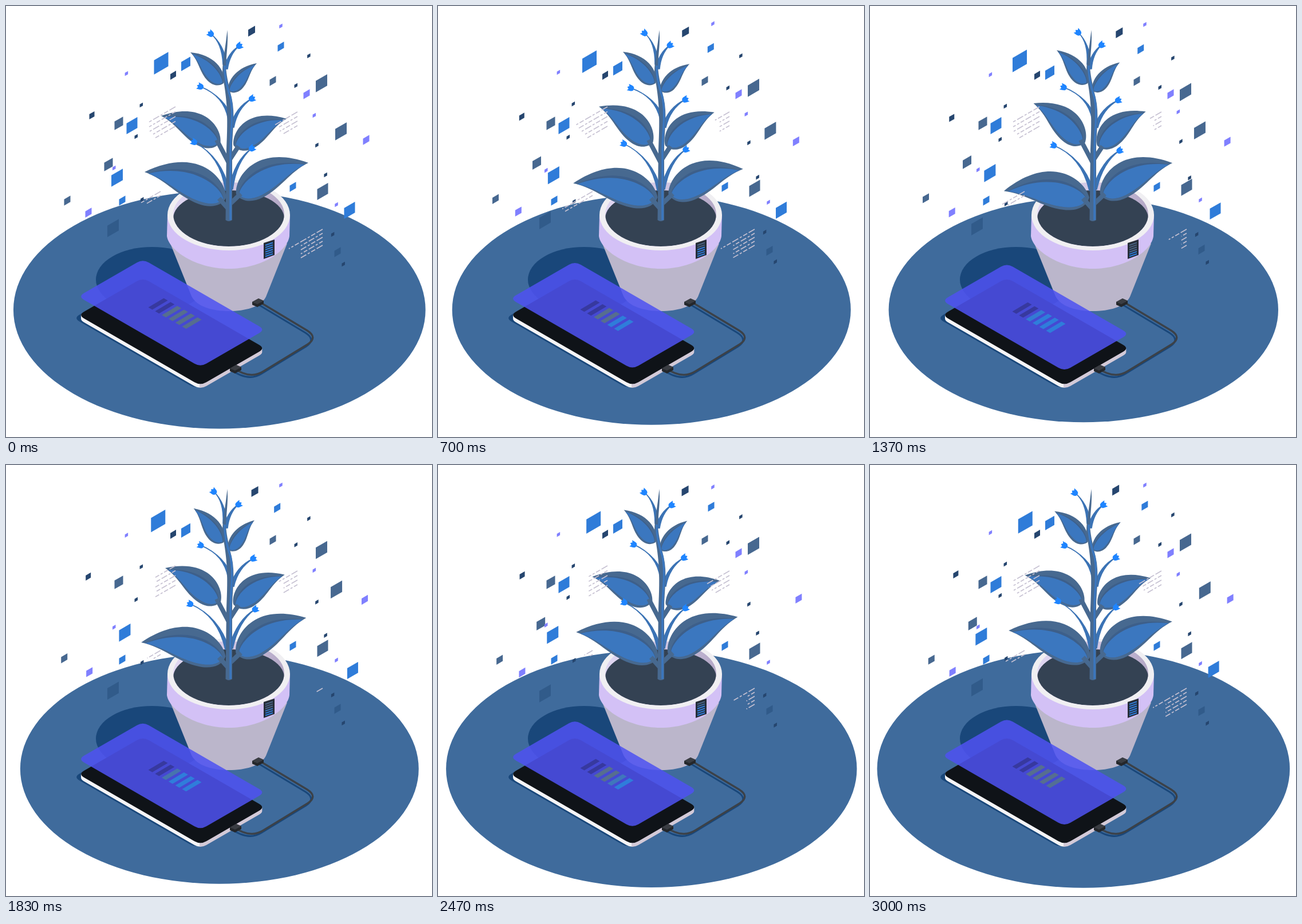
Write an HTML page with a canvas that moves like this. It is 744 by 753 pixels and loops after 3.03 s.

```html
<!DOCTYPE html>
<html lang="en">
<head>
<meta charset="utf-8">
<title>Plant charger</title>
<style>
html, body { margin: 0; width: 100%; height: 100%; overflow: hidden; background: #fff; }
canvas { display: block; }
</style>
</head>
<body>
<canvas id="stage" width="744" height="753"></canvas>
<script>
const ctx = document.getElementById('stage').getContext('2d');
const LOOP = 3030, HALF = LOOP / 2, SLOPE = Math.tan(Math.PI / 6);
const SHADOW = '#19477a', STEM = '#476990', LEAF = '#3b77bf', RIB = '#3d5f8a';
const BLUE = '#2f7cd9', SLATE = '#476890', DARK = '#26466f', PURPLE = '#8080ff', DEEP = '#315b8a';
const LIT = [47, 125, 219];
let now = 0;

// Linear there-and-back motion: 0 at the given phase, 1 half a loop later
const swing = (phase = 0, t = now) => 1 - Math.abs(1 - 2 * ((t - phase + LOOP) % LOOP) / LOOP);
// Every pose is given as it stands at time zero; sway is the change since then
const sway = (amount, phase) => amount * (swing(phase) - swing(phase, 0));
const clamp = v => Math.max(0, Math.min(1, v));
const noise = i => { const v = Math.sin(i * 12.9898) * 43758.5453; return v - Math.floor(v); };
const mix = (a, b, k) => `rgb(${a.map((v, i) => Math.round(v + (b[i] - v) * k))})`;

function fill(color, path) {
  ctx.fillStyle = color;
  ctx.fill(typeof path === 'string' ? new Path2D(path) : path);
}
function ellipse(color, x, y, rx, ry) {
  const p = new Path2D();
  p.ellipse(x, y, rx, ry, 0, 0, 7);
  fill(color, p);
}
function stroke(color, width, path) {
  ctx.strokeStyle = color;
  ctx.lineWidth = width;
  ctx.stroke(new Path2D(path));
}
function placed(x, y, angle, draw) {
  ctx.save();
  ctx.translate(x, y);
  ctx.rotate(angle);
  draw();
  ctx.restore();
}
const radians = degrees => degrees * Math.PI / 180;

// Two groups of squares blink off for a while, twice per loop
function hidden(group) {
  const start = 590 * group - 360, t = now % HALF;
  return group > 0 && t >= start && t < start + 300;
}
function drift(dx, dy, phase, ...squares) {
  for (const [color, x, y, w, blink = 0] of squares) {
    if (hidden(blink)) continue;
    placed(x + sway(dx, phase), y + sway(dy, phase), 0, () => {
      ctx.transform(1, -SLOPE, 0, 1, 0, 0);
      ctx.fillStyle = color;
      ctx.fillRect(-w / 2, -w / 2, w, w);
    });
  }
}
function squares() {
  drift(0, 0, 0, [SLATE, 197, 205, 15], [DARK, 292, 121, 10], [BLUE, 203, 340, 11], [SLATE, 466, 131, 11],
    [BLUE, 501, 316, 11], [BLUE, 220, 209, 19, 1], [PURPLE, 525, 154, 11, 1]);
  drift(0, 17, 0, [BLUE, 314, 101, 16], [SLATE, 551, 135, 20]);
  drift(0, 12, 1150, [SLATE, 553, 324, 19]);
  drift(0, 30, 760, [DEEP, 187, 388, 20]);
  drift(0, -5, 0, [DEEP, 579, 430, 11]);
  drift(14, 6, 1200, [BLUE, 271, 100, 25], [SLATE, 107, 340, 11], [SLATE, 179, 277, 15, 1]);
  drift(8, 4, 760, [PURPLE, 144, 361, 11]);
  drift(8, 3, 400, [BLUE, 600, 357, 19, 2]);
  drift(8, -5, 1150, [PURPLE, 629, 234, 11]);
  drift(17, -9, 0, [BLUE, 194, 300, 20]);
  drift(7, 3, 0, [DARK, 429, 44, 12]);
  drift(-8, 5, 0, [DARK, 150, 191, 9], [BLUE, 480, 71, 11]);
  drift(-10, -2, 0, [SLATE, 585, 219, 20, 2]);
}
// Tiny squares: a loose column on each side of the plant
function dust() {
  for (let i = 0; i < 14; i++) {
    const row = i % 9, left = i > 8;
    const x = left ? 178 + 60 * noise(i) : 480 + 12 * row + 40 * noise(i);
    const y = left ? 118 + 55 * row : 35 + 52 * row;
    drift(0, 9, LOOP * noise(i + 50), [i % 3 ? DARK : PURPLE, x, y, 5.5]);
  }
}

// Rounded isometric slab, given by its top corner
function slab(color, x, y) {
  const a = 113, b = 213.5;
  const pts = [[x, y], [x + b, y + b * SLOPE], [x + b - a, y + (a + b) * SLOPE], [x - a, y + a * SLOPE]];
  const p = new Path2D();
  pts.forEach((c, i) => {
    const toward = q => {
      const k = 12 / Math.hypot(q[0] - c[0], q[1] - c[1]);
      return [c[0] + (q[0] - c[0]) * k, c[1] + (q[1] - c[1]) * k];
    };
    p.lineTo(...toward(pts[(i + 3) % 4]));
    p.quadraticCurveTo(...c, ...toward(pts[(i + 1) % 4]));
  });
  p.closePath();
  fill(color, p);
}

function plug(x, y) {
  fill('#24272b', `M${x} ${y + 6}l11 -6l9 4v5l-11 6l-9 -4Z`);
  fill('#3a3d43', `M${x} ${y + 6}l11 -6l9 4l-11 6Z`);
}
function cable() {
  const path = 'M446 519L526 567Q545 579 527 591L450 638Q433 649 413 641L402 636';
  placed(-3, 4, 0, () => stroke(SHADOW, 3, path));
  stroke('#3b4148', 3.4, path);
  plug(430, 511);
  plug(391, 627);
}

function pot() {
  fill('#bbb6cb', 'M287 415L324 507C333 525 360 533 389 533S445 526 454 508L491 415Z');
  fill('#d3c1f6', 'M282 365L281 402C284 426 330 459 389 459S492 427 495 402L496 365Z');
  ellipse('#f0eff2', 389, 365, 107, 62);
  const wall = ctx.createLinearGradient(292, 0, 486, 0);
  ['#e0d7f2', '#d2c8e5', '#b3a7c5'].forEach((c, i) => wall.addColorStop(i / 2, c));
  ctx.save();
  ctx.beginPath();
  ctx.ellipse(389, 364, 97, 56, 0, 0, 7);
  ctx.clip();
  ctx.fillStyle = wall;
  ctx.fillRect(290, 300, 200, 130);
  ellipse('#344253', 389, 371, 97, 49);
  ctx.restore();

  // Level meter drains from the top while the phone charges
  fill('#262d38', 'M450 414L469 408V435L450 442Z');
  for (let i = 0; i < 6; i++) {
    stroke(mix(LIT, [72, 98, 130], clamp(swing() * 4.3 - i)), 2, `M453 ${418 + i * 3.9}l13 -4.5`);
  }
}

function phone() {
  slab(SHADOW, 231, 480);
  const side = ctx.createLinearGradient(337.5, 0, 338.5, 0);
  side.addColorStop(0, '#f4f4f6');
  side.addColorStop(1, '#d3cad8');
  for (let d = 6.5; d > 0; d--) slab(side, 239, 475 + d);
  slab('#0f1318', 239, 474.7);
}

function panel() {
  const k = swing();
  placed(0, 8 * k, 0, () => {
    slab('rgba(78,82,242,.86)', 239, 442.3);
    for (let i = 0; i < 6; i++) {
      const color = i < 2 ? '#37399f' : mix([86, 110, 143], LIT, clamp(k * 4.3 - (5 - i)));
      fill(color, `M${248.5 + i * 11.8} ${526.5 + i * 6.7}l27 -16l7 4l-27 16Z`);
    }
  });
}

// Unit leaf along x from base 0 to tip 1
const blade = (up, down) => `M1 0C.8 ${up * .7} .6 ${up} .42 ${up}C.22 ${up} .05 ${up * .6} 0 ${up * .17}
  C.02 ${-down * .6} .15 ${-down} .28 ${-down}C.55 ${-down} .72 0 1 0Z`;

function leaf(x, y, tipX, tipY, amount, phase) {
  const dx = tipX - x, dy = tipY - y, size = Math.hypot(dx, dy);
  const up = Math.min(.3, size * .003), down = .22 - size * .0006;
  placed(x, y, Math.atan2(dy, dx) + radians(sway(amount, phase)), () => {
    ctx.scale(size, dx < 0 ? size : -size);
    fill(STEM, blade(up, down));
    ctx.translate(.03, 0);
    ctx.scale(.92, 1);
    fill(RIB, blade(up * .68, down * .75));
    fill(LEAF, blade(up * .58, down * .75));
  });
}
function leaves() {
  leaf(382, 342, 242, 290, 17, 1270);
  leaf(405, 335, 528, 274, -11, 690);
  leaf(372, 243, 271, 192, -21, 1170);
  leaf(400, 248, 490, 197, 16, 1080);
  leaf(378, 137, 322, 81, 7, 250);
  leaf(390, 150, 438, 100, -8, 500);
}

// Tapered stalk that leaves the stem upright and bends out to a tulip bud
function flower(x, y, tipX, tipY, amount, phase = 0) {
  const dx = tipX - x, dy = tipY - y, cx = dx * .2, cy = dy * .72;
  placed(x, y, radians(sway(amount, phase)), () => {
    const stalk = `M-3 0Q${cx} ${cy} ${dx} ${dy}Q${cx + 3} ${cy + 3} 4 0Z`;
    fill('#3b73b5', stalk);
    stroke('#3b73b5', 1.6, stalk);
    placed(dx, dy, Math.atan2(dy - cy, dx - cx), () =>
      fill('#1f85ff', 'M-5 0C-5 -6 1 -5 6 -6L4 -2.5L7 0L4 2.5L6 6C1 5 -5 6 -5 0Z'));
  });
}
function flowers() {
  flower(382, 102, 358, 49, 7);
  flower(383, 110, 407, 70, 7, 1130);
  flower(391, 198, 340, 141, 6, 850);
  flower(394, 212, 429, 162, -6, 1270);
  flower(386, 322, 329, 238, -6);
  flower(392, 320, 429, 249, 6);
}

function stem() {
  stroke(STEM, 8, 'M388 354L372 336M391 346L410 328M389 274L368 234M391 268L406 245');
  fill(STEM, 'M383.5 374L385 250C388 190 386 165 379 125C376 105 382 85 386.5 42C388 60 386 75 385 90C382 110 387 130 394 160C401 190 395 220 395 250V374Q389 378 383.5 374Z');
  stroke(LEAF, 3.5, 'M392 374V250C392 220 398 190 392 160C385 138 381 120 382 104');
}

// Dashed streaks, revealed leftwards from their right ends
function streak(x, y, count, step, length, edge, reach, phase, lag) {
  const clip = edge - sway(reach, phase);
  for (let i = 0; i < count; i++) {
    const left = Math.max(x - length + 5 * i, clip + (i ? lag : 0)), top = y + i * step;
    if (left >= x) continue;
    ctx.setLineDash(i % 2 ? [7, 3, 4, 3, 11, 3] : [12, 3, 8, 3, 4, 3]);
    stroke('#c6c1d2', 1.6, `M${x} ${top}L${left} ${top + (x - left) * SLOPE}`);
  }
  ctx.setLineDash([]);
}
function streaks() {
  streak(296, 176, 5, 8.5, 55, 250, 36, 2200, 0);
  streak(509, 185, 4, 8, 41, 469, 32, 1100, 8);
  streak(270, 324, 2, 7, 53, 236, 53, 2280, 10);
  streak(553, 390, 5, 7, 59, 493, 64, 1860, 22);
}

function frame(time) {
  now = time % LOOP;
  ctx.fillStyle = '#fff';
  ctx.fillRect(0, 0, 744, 753);
  const rx = 338.5 + 25.5 * swing(1270);
  ellipse('#3f6b9c', 372.8, 530.8, rx, rx * SLOPE);
  ellipse(SHADOW, 255, 478, 98, 57);
  squares();
  dust();
  pot();
  phone();
  cable();
  panel();
  leaves();
  flowers();
  stem();
  streaks();
}
const begin = performance.now();
function tick() {
  frame(performance.now() - begin);
  requestAnimationFrame(tick);
}
tick();
</script>
</body>
</html>
```
